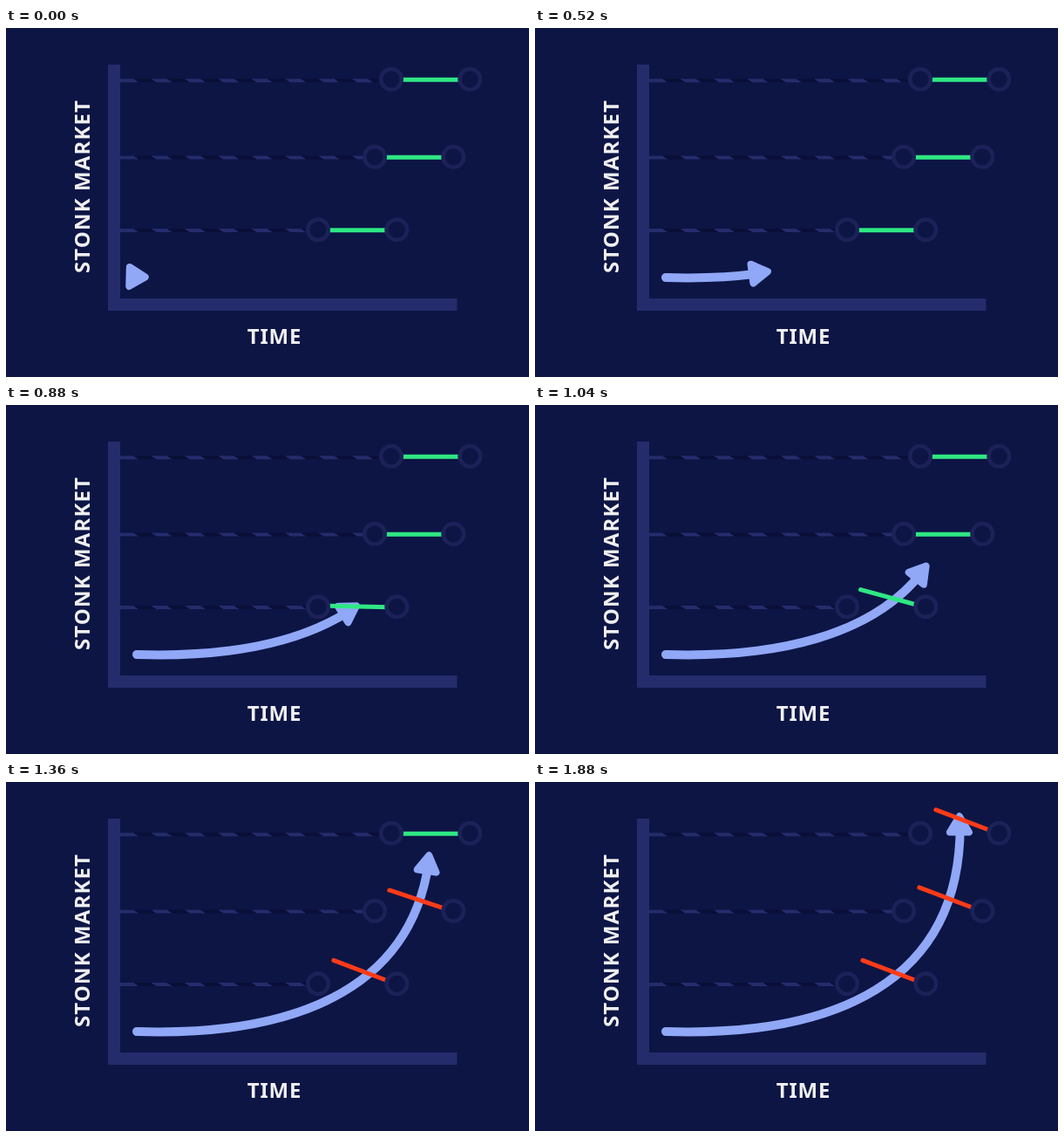
Animation of 600x400 px, one loop 2640 ms. Source, as an HTML page:

```html
<!DOCTYPE html>
<html lang="en">
<head>
<meta charset="utf-8">
<title>Stonk market</title>
<style>
  html, body { margin: 0; width: 100%; height: 100%; overflow: hidden; background: #0d1545; }
  svg { display: block; width: 600px; height: 400px; }
  text { font: 700 24px "Noto Sans", "Open Sans", sans-serif; letter-spacing: 1.1px; fill: #efeff0; text-anchor: middle; }
  .time { letter-spacing: 0.8px; }
  .axis { fill: #252c6c; }
  .gap { fill: #0a0f38; }
  .node { fill: #0d1545; stroke: #1c2158; stroke-width: 4.5; }
  .bar { stroke-width: 5; stroke-linecap: round; }
  #body { fill: none; stroke: #90a8f6; stroke-width: 10; stroke-linecap: round; }
  #head { fill: #90a8f6; stroke: #90a8f6; stroke-width: 8; stroke-linejoin: round; }
</style>
</head>
<body>
<svg id="stage" viewBox="0 0 600 400">
  <g id="tracks"></g>
  <path class="axis" d="M117 42H131V310H517.5V324H117Z"/>
  <text class="time" x="308" y="362">TIME</text>
  <text transform="translate(96.4 181.5) rotate(-90)">STONK MARKET</text>
  <path id="body" d="M150 286C342 292 488.5 231 487.7 49"/>
  <path id="head" d="M-8.5 -11L9.7 0L-8.5 11Z"/>
  <g id="bars"></g>
  <g id="nodes"></g>
</svg>
<script>
const LOOP = 2640, STEP = 40, TRAVEL = 1680;
const SWING = 440, ANGLE = 20.7, FLIP = 240;
const GREEN = "#2ee883", RED = "#ff3b17";

// Left and right node, node height, track height, time the arrow arrives
const rows = [
  { left: 358, right: 448.3, y: 231.2, track: 232, start: 849 },
  { left: 423, right: 513.3, y: 147.7, track: 148.5, start: 1096 },
  { left: 442, right: 532.3, y: 58.7, track: 60.2, start: 1385 }
];

const $ = id => document.getElementById(id);

function add(parent, tag, attrs) {
  const el = document.createElementNS("http://www.w3.org/2000/svg", tag);
  for (const key in attrs) el.setAttribute(key, attrs[key]);
  return $(parent).appendChild(el);
}

function drawTrack(row) {
  const top = row.track - 2, end = row.left - 10;
  add("tracks", "rect", { class: "gap", x: 131, y: top, width: end - 131, height: 4 });
  let d = `M131 ${top}H146l6 4H131Z`;
  for (let x = 166.5; x < end - 15; x += 38.4) d += `M${x} ${top}h18l6 4h-18Z`;
  add("tracks", "path", { class: "axis", d });
}

for (const row of rows) {
  drawTrack(row);
  row.pivot = row.y + 0.6;
  row.bar = add("bars", "line", {
    class: "bar", x1: row.right - 77.4, y1: row.pivot, x2: row.right - 8, y2: row.pivot
  });
  for (const cx of [row.left, row.right]) add("nodes", "circle", { class: "node", cx, cy: row.y, r: 11.8 });
}

function bezier(x1, y1, x2, y2) {
  const curve = (a, b, u) => 3 * a * u * (1 - u) ** 2 + 3 * b * u * u * (1 - u) + u ** 3;
  return p => {
    if (p <= 0 || p >= 1) return p <= 0 ? 0 : 1;
    let lo = 0, hi = 1;
    for (let i = 0; i < 24; i++) {
      const mid = (lo + hi) / 2;
      if (curve(x1, x2, mid) < p) lo = mid; else hi = mid;
    }
    return curve(y1, y2, lo);
  };
}

const swing = bezier(0.25, 0.1, 0.25, 1);
const travel = bezier(0.333, 0, 0.667, 1);
const body = $("body"), head = $("head");
const total = body.getTotalLength();

function draw(time) {
  const t = Math.floor((time % LOOP) / STEP) * STEP;
  const length = total * travel(t / TRAVEL);
  const at = body.getPointAtLength(length);
  const a = body.getPointAtLength(Math.max(0, length - 3));
  const b = body.getPointAtLength(Math.min(total, length + 3));
  const turn = Math.atan2(b.y - a.y, b.x - a.x) * 180 / Math.PI;
  body.setAttribute("stroke-dasharray", `${Math.max(length, 0.01)} ${total + 20}`);
  head.setAttribute("transform", `translate(${at.x} ${at.y}) rotate(${turn}) translate(0 -0.8)`);
  for (const { bar, right, pivot, start } of rows) {
    const angle = ANGLE * swing((t - start) / SWING);
    bar.setAttribute("transform", `rotate(${angle} ${right} ${pivot})`);
    bar.setAttribute("stroke", t - start < FLIP ? GREEN : RED);
  }
}

const origin = performance.now();
function tick() {
  draw(performance.now() - origin);
  requestAnimationFrame(tick);
}
tick();
</script>
</body>
</html>
```
